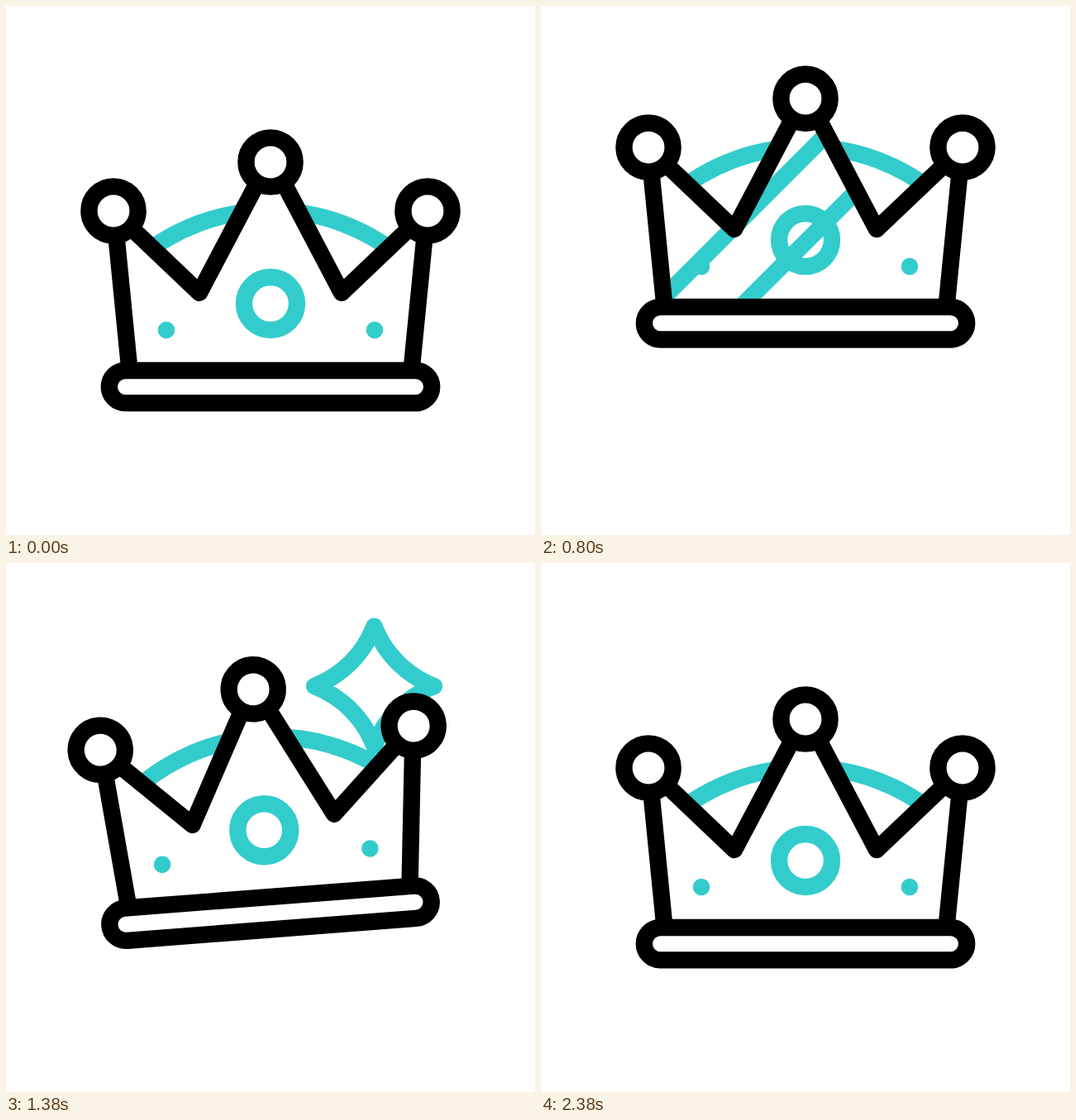
These frames come from a looping animation (640 px wide and 640 px high, 2400 ms). An HTML page:

```html
<!DOCTYPE html>
<html lang="en">
<head>
<meta charset="utf-8">
<title>Crown</title>
<style>
  html, body { margin: 0; width: 100%; height: 100%; overflow: hidden; background: #fff; }
  svg { display: block; width: 100vw; height: 100vh; }
  .ink { fill: none; stroke: #000; stroke-width: 20.4; stroke-linejoin: round; }
  .teal { fill: none; stroke: #33cccc; stroke-width: 20.4; stroke-linejoin: round; }
  .dot { fill: #33cccc; }
  .ink.solid { fill: #fff; }
</style>
</head>
<body>
<svg viewBox="0 0 640 640">
  <defs>
    <clipPath id="body">
      <path d="M133.5 279 L152 269 L234 347 L303 216 H337 L406 347 L488 269 L506.5 279 L491 436 H149 Z"/>
    </clipPath>
  </defs>
  <path id="star" class="teal" transform="translate(445.5 149)"/>
  <g id="crown">
    <path class="teal" d="M160 305.6 A249 249 0 0 1 480 305.6"/>
    <path fill="#fff" d="M133.5 279 L152 269 L234 347 L303 216 H337 L406 347 L488 269 L506.5 279 L491 436 H149 Z"/>
    <circle class="teal" cx="320" cy="360" r="32"/>
    <circle class="dot" cx="194" cy="392" r="10.3"/>
    <circle class="dot" cx="446" cy="392" r="10.3"/>
    <g clip-path="url(#body)"><path id="shine" class="teal"/></g>
    <path class="ink" d="M133.5 279 L149 436 M506.5 279 L491 436"/>
    <path class="ink" d="M152 269 L234 347 L303 216 M337 216 L406 347 L488 269"/>
    <circle class="ink solid" cx="130" cy="248" r="29.6"/>
    <circle class="ink solid" cx="320" cy="189" r="29.6"/>
    <circle class="ink solid" cx="510" cy="248" r="29.6"/>
    <rect class="ink solid" x="124.8" y="441" width="390.4" height="39.4" rx="19.7"/>
  </g>
</svg>
<script>
const LOOP = 2400;
const crown = document.getElementById('crown');
const star = document.getElementById('star');
const shine = document.getElementById('shine');

const part = (t, a, b) => Math.min(1, Math.max(0, (t - a) / (b - a)));
const soft = u => (1 - Math.cos(Math.PI * u)) / 2;
const quart = u => u < 0.5 ? 8 * u ** 4 : 1 - 8 * (1 - u) ** 4;

// A tall leap, then two smaller hops that lean to the left.
function pose(t) {
  if (t < 1100) {
    const lift = 77.1 * quart(part(t, 90, 910)) * (1 - part(t, 910, 1100) ** 2);
    return { lift, lean: 0 };
  }
  const hop = (a, b, height, angle) => {
    const s = Math.sin(Math.PI * part(t, a, b));
    return { lift: height * s, lean: -angle * s * s };
  };
  return t < 1665 ? hop(1100, 1665, 37, 4.4) : hop(1665, 2100, 18, 2);
}

// Pops in past its size, rests, swells again and vanishes.
function starSize(t) {
  if (t < 1270) return 81 * soft(part(t, 1085, 1270));
  if (t < 1960) return 81 - 27 * soft(part(t, 1270, 1560));
  if (t < 2205) return 54 + 27 * soft(part(t, 1960, 2205));
  return 81 * (1 - soft(part(t, 2205, 2375)));
}

function starPath(r) {
  const arc = `A${1.736 * r} ${1.736 * r} 0 0 0 `;
  return `M0 ${-r}${arc}${r} 0${arc}0 ${r}${arc}${-r} 0${arc}0 ${-r}Z`;
}

// Diagonal where x + y equals the given sum.
const stripe = sum => `M${sum - 500} 500 L${sum - 150} 150`;

function draw(t) {
  const { lift, lean } = pose(t);
  crown.setAttribute('transform', `translate(0 ${-lift}) rotate(${lean} 320 460.5)`);

  const sum = 576 + (t - 800) * 1.7;
  const lit = t > 610 && t < 1040;
  shine.setAttribute('d', lit ? stripe(sum) + stripe(sum + 105) : '');

  const r = starSize(t);
  star.setAttribute('d', r > 0.1 ? starPath(r) : '');
}

const start = performance.now();
function tick() {
  draw((performance.now() - start) % LOOP);
  requestAnimationFrame(tick);
}
draw(0);
requestAnimationFrame(tick);
</script>
</body>
</html>
```
